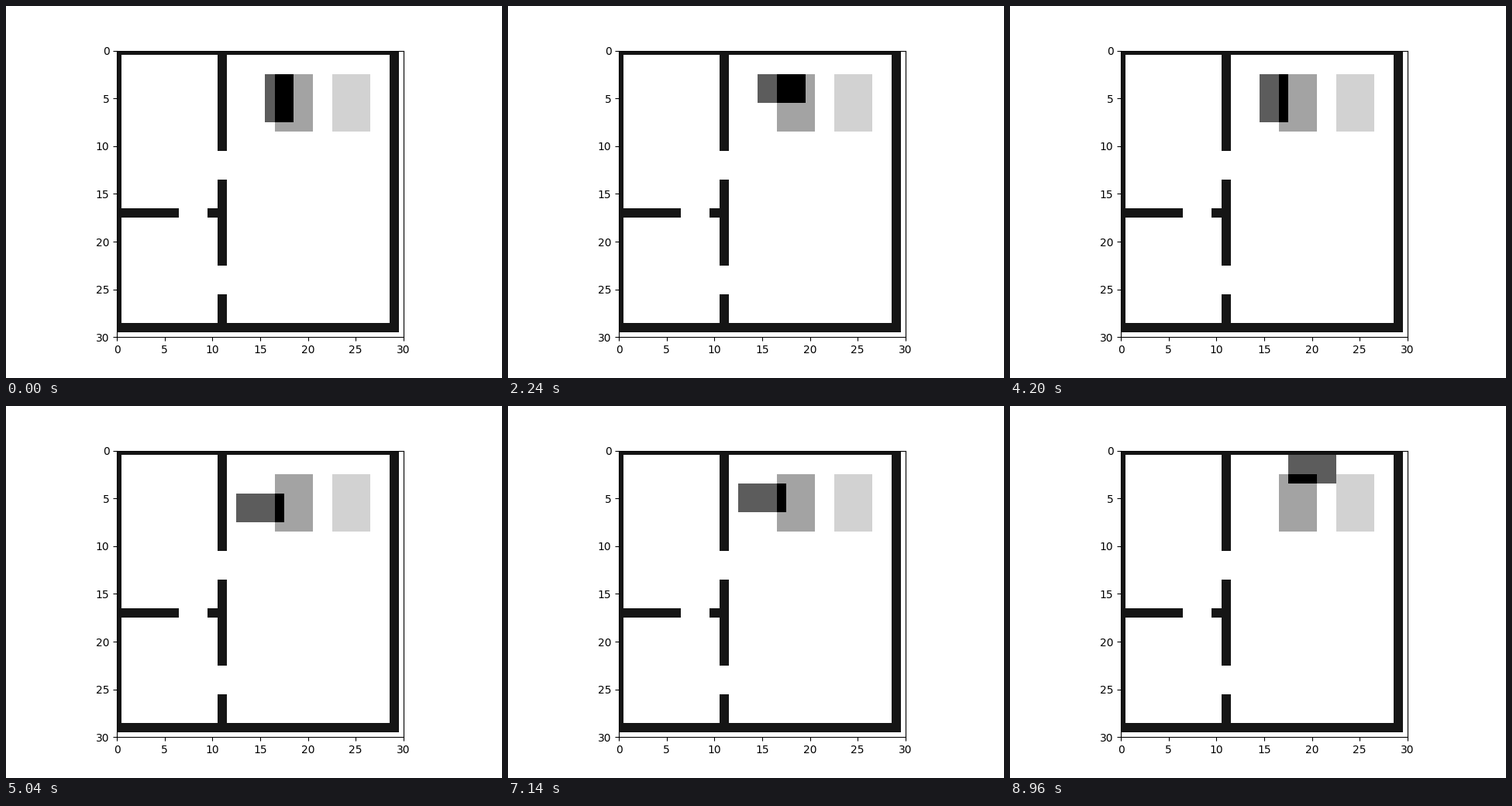
A matplotlib script that plays this animation: 640 by 480 pixels, repeating every 9100 ms.

```python
import numpy as np
import matplotlib.pyplot as plt
from matplotlib.animation import FuncAnimation

SIZE = 30
TICK = 140
WALL, ZONE, SHELF, PIECE = 234, 92, 45, 163

# One letter per tick; a capital also turns the piece, "t" only turns it.
STEPS = {
    "l": (-1, 0), "r": (1, 0), "u": (0, -1), "d": (0, 1),
    "q": (-1, -1), "e": (1, -1), "z": (-1, 1), "c": (1, 1),
    "t": (0, 0),
}
WALK = (
    "dutruruu" "ldtddqtl" "ururdDdl" "llurddtl"
    "lucrullu" "culdrrdl" "eleeuzdz" "RruRuer"
)


def build_room():
    room = np.zeros((SIZE, SIZE))
    room[[0, -1], :] = WALL
    room[:, [0, -1]] = WALL
    room[:, 11] = WALL
    room[17, :12] = WALL
    # doorways
    room[11:14, 11] = 0
    room[23:26, 11] = 0
    room[17, 7:10] = 0
    room[3:9, 17:21] = ZONE
    room[3:9, 23:27] = SHELF
    return room


def build_poses():
    x, y, upright = 17, 5, True
    poses = [(x, y, upright)] * 2
    for key in WALK:
        dx, dy = STEPS[key.lower()]
        x, y = x + dx, y + dy
        if key == "t" or key.isupper():
            upright = not upright
        poses.append((x, y, upright))
    return poses


ROOM = build_room()
POSES = build_poses()


def grid_at(i):
    x, y, upright = POSES[i]
    half_w, half_h = (1, 2) if upright else (2, 1)
    grid = ROOM.copy()
    grid[y - half_h:y + half_h + 1, x - half_w:x + half_w + 1] += PIECE
    return grid


fig, ax = plt.subplots(figsize=(6.4, 4.8), dpi=100)
image = ax.imshow(grid_at(0), cmap="binary")
ax.set_xlim(0, SIZE)
ax.set_ylim(SIZE, 0)
ax.set_xticks(range(0, SIZE + 1, 5))
ax.set_yticks(range(0, SIZE + 1, 5))


def draw(i):
    grid = grid_at(i)
    image.set_data(grid)
    # shades are relative to the darkest cell
    image.set_clim(0, grid.max())
    return [image]


anim = FuncAnimation(fig, draw, frames=len(POSES), interval=TICK,
                     repeat=True, repeat_delay=0)
plt.show()
```
